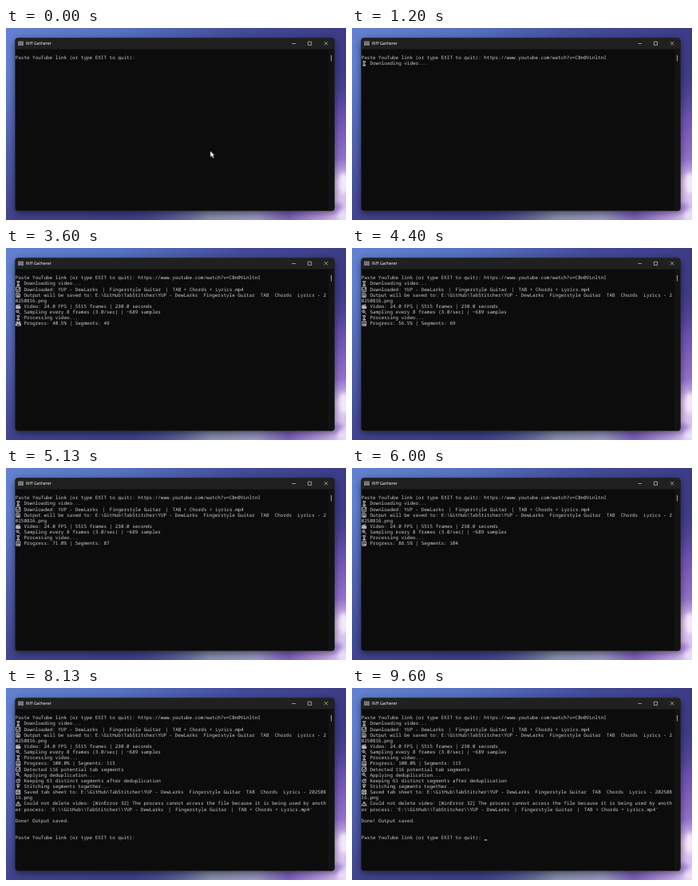
Animation, 426 px wide and 240 px high, one loop 9670 ms. Source, as an HTML page:

```html
<!DOCTYPE html>
<html lang="en">
<head>
<meta charset="utf-8">
<title>Console</title>
<style>
html, body { margin: 0; width: 100%; height: 100%; overflow: hidden; background: #3c4088; }
svg { display: block; width: 100vw; height: 100vh; }
text { text-rendering: geometricPrecision; white-space: pre; }
#console text { font: 5.967px "Noto Sans Mono", "DejaVu Sans Mono", monospace; fill: #ccc; }
#console path { fill: none; stroke: #d8d8d8; stroke-width: .85; }
</style>
</head>
<body>
<svg viewBox="0 0 426 240" preserveAspectRatio="none">
  <defs>
    <linearGradient id="sky">
      <stop offset="0" stop-color="#6381d0"/>
      <stop offset=".35" stop-color="#5570c0"/>
      <stop offset=".7" stop-color="#424a98"/>
      <stop offset="1" stop-color="#3d3b86"/>
    </linearGradient>
    <linearGradient id="dusk" x2="0" y2="1">
      <stop offset=".2" stop-color="#38347c" stop-opacity="0"/>
      <stop offset="1" stop-color="#38347c" stop-opacity=".8"/>
    </linearGradient>
    <linearGradient id="side" x2="0" y2="1">
      <stop offset=".2" stop-color="#4a4296" stop-opacity="0"/>
      <stop offset=".45" stop-color="#6a50b2"/>
      <stop offset=".68" stop-color="#9270cc"/>
      <stop offset=".8" stop-color="#e0c8f4"/>
      <stop offset="1" stop-color="#d4bcf0"/>
    </linearGradient>
    <linearGradient id="horizon">
      <stop offset=".35" stop-color="#454a90" stop-opacity="0"/>
      <stop offset=".6" stop-color="#8a92b0"/>
      <stop offset=".74" stop-color="#9a98c4"/>
      <stop offset=".83" stop-color="#7c60bc"/>
      <stop offset=".92" stop-color="#b496e0"/>
      <stop offset="1" stop-color="#e4d0f6"/>
    </linearGradient>
    <filter id="soft" x="-50%" y="-50%" width="200%" height="200%"><feGaussianBlur stdDeviation="2.5"/></filter>
    <filter id="shade" x="-20%" y="-20%" width="140%" height="140%"><feGaussianBlur stdDeviation="5"/></filter>
  </defs>

  <rect width="426" height="240" fill="url(#sky)"/>
  <rect width="426" height="240" fill="url(#dusk)"/>
  <rect x="405" width="21" height="240" fill="url(#side)"/>
  <rect y="224" width="426" height="16" fill="url(#horizon)"/>
  <g filter="url(#soft)">
    <ellipse cx="423" cy="194" rx="6" ry="13" fill="#f4eafc"/>
    <ellipse cx="415" cy="226" rx="8" ry="7" fill="#b090de"/>
    <ellipse cx="424" cy="234" rx="9" ry="7" fill="#eadcf8"/>
  </g>
  <rect x="11" y="15" width="401" height="217" rx="5" fill="#000" opacity=".5" filter="url(#shade)"/>

  <rect x="11.5" y="12.5" width="400" height="216" rx="3.5" fill="#0c0c0c" stroke="#2c2c32" stroke-width=".5"/>
  <path d="M11.8 26.5V16a3.3 3.3 0 0 1 3.3-3.3H407.9a3.3 3.3 0 0 1 3.3 3.3V26.5Z" fill="#202020"/>
  <path d="M404 26.5H411.2V225a3.3 3.3 0 0 1-3.3 3.2H404Z" fill="#131313"/>
  <rect x="407" y="34" width="1" height="7.5" fill="#a0a0a0"/>
  <rect x="15" y="16.5" width="7" height="5.5" fill="#777"/>
  <text x="25" y="21.3" fill="#fff" style="font: 5.36px 'Open Sans', 'Noto Sans', sans-serif">Riff Gatherer</text>
  <path d="M358.3 19.5h4.6M378.4 17.2h4.2v4.2h-4.2zM398.9 17.1l4.3 4.3m0-4.3l-4.3 4.3" fill="none" stroke="#e8e8e8" stroke-width=".6"/>

  <g id="console"></g>
  <rect id="caret" width="3.6" height="1.1" fill="#ccc"/>
  <path id="pointer" d="M256 153.8v7.6l1.8-1.6 1.3 3 1.4-.6-1.3-2.9h2.4z" fill="#fff" stroke="#111" stroke-width=".4"/>
</svg>
<script>
const LOOP = 9670, LEFT = 11.7, TOP = 39.2, CELL = 3.58, PITCH = 7.15;
const $ = id => document.getElementById(id);

// Icons fill a box 7 wide and 6 high.
const icons = {
  hourglass: 'M1.6 .4h3.6M1.6 5.7h3.6M2 .4c0 2 2.8 3.2 2.8 5.3M4.8 .4c0 2-2.8 3.2-2.8 5.3M2.6 5h1.6',
  check: 'M.8 .5h5v5.2h-5zM1.9 3l1.2 1.4 2.4-3.4',
  page: 'M1 .4h3.2l1.3 1.4v4h-4.5zM2 2.4h2.4M2 3.6h2.4M2 4.7h2.4',
  clapper: 'M.8 2.6h5v3h-5zM.8 1.7l4.8-1M1 3.6h4.6M1 4.6h4.6',
  lens: 'M1 2.1a1.6 1.6 0 1 1 3.2 0a1.6 1.6 0 1 1-3.2 0M2 2.1h1.2M3.8 3.3l2.2 2.3',
  bars: 'M1 .5h4.7v5.2h-4.7zM2.2 5.2v-2.2M3.4 5.2v-3.8M4.6 5.2v-1.6',
  wideBars: 'M.4 5.6h6.2v-2h-6.2zM1.2 4.8v-4.2h1.4v3M4.4 3.6v-3h1.3v4M2.6 2.2h1.8',
  target: 'M1 3.4a2.3 2.3 0 1 1 4.6 0a2.3 2.3 0 1 1-4.6 0M2.5 3.4h1.7M3.4 3.2l2.5-2.7',
  thread: 'M1.2 .8h4.6M1.4 2.2h3.8M2 3.5h2.8M2.4 5.5l1-2',
  disk: 'M.8 .5h5v5.2h-5zM2 .6v1.8h2.6v-1.8M2 5.6v-1.8h2.8v1.8',
  warning: 'M3.4 .5l3 5.1h-6zM3.4 2v1.8M3.4 4.3v.7'
};

const song = 'YUP - DewLarks';
const video = song + ' ｜ Fingerstyle Guitar ｜ TAB + Chords + Lyrics.mp4';
const sheet = 'E:\\GitHub\\TabStitcher\\' + song + '  Fingerstyle Guitar  TAB  Chords  Lyrics - ';
const prompt = 'Paste YouTube link (or type EXIT to quit):';

// [appears at, row, text, icon]
const lines = [
  [0, 0, prompt],
  [600, 0, ' '.repeat(43) + 'https://www.youtube.com/watch?v=CBn0VLnltnI'],
  [870, 1, 'Downloading video...', 'hourglass'],
  [1330, 2, 'Downloaded: ' + video, 'check'],
  [1400, 3, 'Output will be saved to: ' + sheet + '2', 'page'],
  [1400, 4, '0250816.png'],
  [1530, 5, 'Video: 24.0 FPS | 5515 frames | 230.0 seconds', 'clapper'],
  [1530, 6, 'Sampling every 8 frames (3.0/sec) | ~689 samples', 'lens'],
  [1600, 7, 'Processing video...', 'hourglass'],
  [1670, 8, '', 'bars'],
  [6600, 9, 'Detected 116 potential tab segments', 'check'],
  [6600, 10, 'Applying deduplication...', 'lens'],
  [6730, 11, 'Keeping 61 distinct segments after deduplication', 'target'],
  [6730, 12, 'Stitching segments together...', 'thread'],
  [7330, 13, 'Saved tab sheet to: ' + sheet + '202508', 'disk'],
  [7330, 14, '16.png'],
  [7400, 15, 'Could not delete video: [WinError 32] The process cannot access the file because it is being used by anoth', 'warning'],
  [7400, 16, "er process: 'E:\\\\GitHub\\\\TabStitcher\\\\" + video + "'"],
  [7400, 18, 'Done! Output saved.'],
  [7400, 21, prompt]
];

function add(parent, tag, attrs, content = '') {
  const el = document.createElementNS('http://www.w3.org/2000/svg', tag);
  for (const key in attrs) el.setAttribute(key, attrs[key]);
  el.textContent = content;
  return parent.appendChild(el);
}

// A full-width bar takes two cells, so the text around it is placed by column.
function addText(group, column, y, content) {
  const put = (col, part) => add(group, 'text', { x: LEFT + col * CELL, y }, part.replace(/ /g, '\u00a0'));
  let last;
  content.split('｜').forEach((part, i) => {
    if (i) { put(column + .5, '|'); column += 2; }
    last = put(column, part);
    column += part.length;
  });
  return last;
}

const rows = lines.map(([at, row, content, icon]) => {
  const group = add($('console'), 'g', {});
  const y = TOP + row * PITCH;
  const mark = icon && add(group, 'path', { d: icons[icon], transform: `translate(${LEFT + .2} ${y - 5})` });
  return { at, group, mark, label: addText(group, icon ? 3 : 0, y, content) };
});
const progress = rows[9];

function interpolate(points, x) {
  if (x <= points[0][0]) return points[0][1];
  for (let i = 1; i < points.length; i++) {
    const [x0, y0] = points[i - 1], [x1, y1] = points[i];
    if (x <= x1) return y0 + (y1 - y0) * (x - x0) / (x1 - x0);
  }
  return points[points.length - 1][1];
}
const percentAt = [[1670, 0], [2200, 11.5], [3600, 40.5], [5130, 71], [6570, 100]];
const segmentsAt = [[0, 0], [11.5, 12], [40.5, 49], [71, 87], [100, 115]];

const show = (el, on) => el.setAttribute('visibility', on ? 'visible' : 'hidden');
const blink = t => Math.floor(t / 530) % 2 === 0;

function draw(t) {
  for (const { at, group } of rows) show(group, t >= at);
  const percent = Math.round(interpolate(percentAt, t) * 2) / 2;
  const segments = Math.round(interpolate(segmentsAt, percent));
  progress.label.textContent = `Progress: ${percent.toFixed(1)}% | Segments: ${segments}`;
  progress.mark.setAttribute('d', t < 4400 ? icons.wideBars : icons.bars);

  const atEnd = t >= 7400;
  $('caret').setAttribute('x', LEFT + 43 * CELL);
  $('caret').setAttribute('y', TOP + (atEnd ? 21 : 0) * PITCH + .1);
  show($('caret'), atEnd ? blink(t - 7400) : t < 600 && blink(t + 530));
  show($('pointer'), t < 600);
}

function tick(now) {
  draw(now % LOOP);
  requestAnimationFrame(tick);
}
draw(0);
requestAnimationFrame(tick);
</script>
</body>
</html>
```
